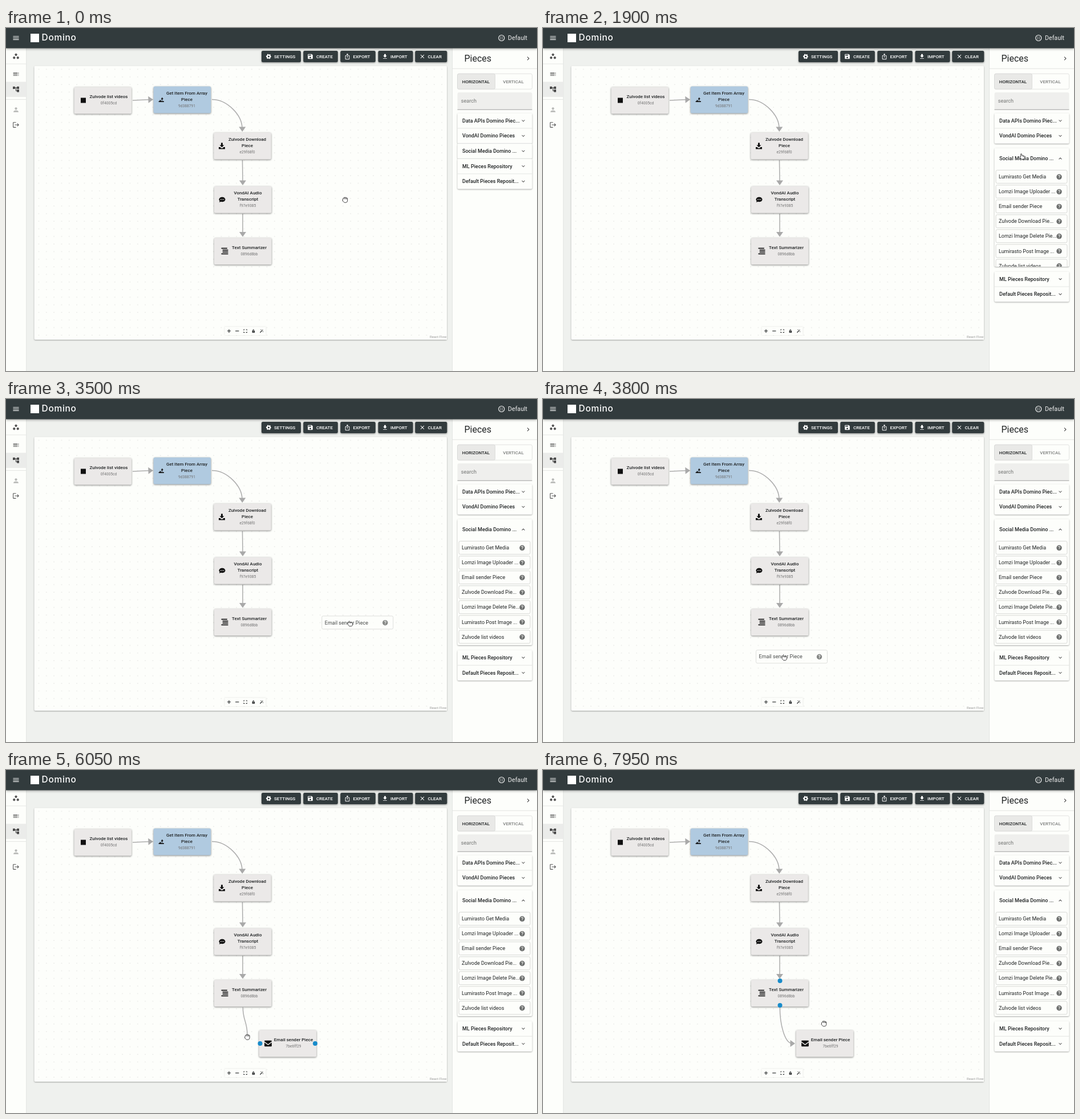
Animation, 931 px wide and 602 px high, one loop 8 s. Source, as an HTML page:

```html
<!DOCTYPE html>
<html lang="en">
<head>
<meta charset="utf-8">
<title>Workflow editor</title>
<style>
html, body { margin: 0; width: 100%; height: 100%; overflow: hidden; background: #eff1ee; }
svg { display: block; width: 931px; height: 602px; font-family: Roboto, sans-serif; }
.paper { fill: #fdfefb; filter: drop-shadow(0 1px 1px #0005); }
.node { filter: drop-shadow(0 1px 1.5px #0007); }
.line { stroke: #dfe0dd; stroke-width: .8; }
.edge { fill: none; stroke: #adadad; stroke-width: 1.5; }
.tip { fill: #a9a9a9; }
.dot { fill: #178bca; }
</style>
</head>
<body>
<svg id="stage" viewBox="0 0 931 602"></svg>
<script>
const WHITE = '#fdfefb', INK = '#202324', DARK = '#323b3d';
const ICON = {
  menu: 'M3 18h18v-2H3zM3 13h18v-2H3zM3 6v2h18V6z',
  groups: 'M6 13a4 4 0 1 0 .01 0zM12 3a4 4 0 1 0 .01 0zM18 13a4 4 0 1 0 .01 0z',
  toc: 'M3 9h14V7H3zM3 13h14v-2H3zM3 17h14v-2H3zM19 17h2v-2h-2zM19 7v2h2V7zM19 13h2v-2h-2z',
  tree: 'M22 11V3h-7v3H9V3H2v8h7V8h2v10h4v3h7v-8h-7v3h-2V8h2v3z',
  person: 'M12 12a4 4 0 1 0 0-8 4 4 0 0 0 0 8zm0 2c-2.67 0-8 1.34-8 4v2h16v-2c0-2.66-5.33-4-8-4z',
  logout: 'M17 7l-1.41 1.41L18.17 11H8v2h10.17l-2.58 2.58L17 17l5-5zM4 5h8V3H4c-1.1 0-2 .9-2 2v14c0 1.1.9 2 2 2h8v-2H4z',
  save: 'M17 3H5a2 2 0 0 0-2 2v14c0 1.1.9 2 2 2h14c1.1 0 2-.9 2-2V7zm-5 16a3 3 0 1 1 0-6 3 3 0 0 1 0 6zm3-10H5V5h10z',
  share: 'M16 5l-1.42 1.42-1.59-1.59V16h-1.98V4.83L9.42 6.42 8 5l4-4zm4 5v11c0 1.1-.9 2-2 2H6a2 2 0 0 1-2-2V10c0-1.1.9-2 2-2h3v2H6v11h12V10h-3V8h3c1.1 0 2 .9 2 2z',
  get: 'M19 9h-4V3H9v6H5l7 7zM5 18v2h14v-2z',
  close: 'M19 6.41L17.59 5 12 10.59 6.41 5 5 6.41 10.59 12 5 17.59 6.41 19 12 13.41 17.59 19 19 17.59 13.41 12z',
  down: 'M16.59 8.59L12 13.17 7.41 8.59 6 10l6 6 6-6z',
  right: 'M10 6L8.59 7.41 13.17 12l-4.58 4.59L10 18l6-6z',
  help: 'M12 2a10 10 0 1 0 0 20 10 10 0 0 0 0-20zm1 17h-2v-2h2zm2.07-7.75l-.9.92C13.45 12.9 13 13.5 13 15h-2v-.5c0-1.1.45-2.1 1.17-2.83l1.24-1.26c.37-.36.59-.86.59-1.41a2 2 0 0 0-4 0H8a4 4 0 1 1 8 0c0 .88-.36 1.68-.93 2.25z',
  square: 'M3 3h18v18H3z',
  lift: 'M1 21v-4h4v-4h5v4h12v4zM13 15v-6h-3l5-7 5 7h-4v6z',
  load: 'M9 1h6v8h5l-8 8-8-8h5zM1 16h5l4 4h4l4-4h5v7H1z',
  chat: 'M12 3C5.5 3 1 7 1 11.5c0 2 .9 4 2.4 5.300L1.500 21c3 0 5-.8 6.500-1.700 1.200.4 2.600.6 4 .6 6.500 0 11-3.900 11-8.400S18.500 3 12 3zM7 10a1.500 1.500 0 1 1-.01 0zM12 10a1.500 1.500 0 1 1-.01 0zM17 10a1.500 1.500 0 1 1-.01 0z',
  bars: 'M1 1h19v3H1zM5 7h18v3H5zM5 13h18v3H5zM1 19h22v3H1z',
  mail: 'M1 5q0-2 2-2h18q2 0 2 2v1l-11 8L1 6zM1 9l11 8 11-8v10q0 2-2 2H3q-2 0-2-2z',
  plus: 'M10 1h4v9h9v4h-9v9h-4v-9H1v-4h9z',
  minus: 'M1 10h22v4H1z',
  fit: 'M1 8V1h7v3H4v4zM16 1h7v7h-3V4h-4zM23 16v7h-7v-3h4v-4zM8 23H1v-7h3v4h4z',
  lock: 'M4 10h3V7a5 5 0 0 1 10 0h-3a2 2 0 0 0-4 0v3h10v12H4zM12 14a2 2 0 1 0 .01 0z',
  wand: 'M1 20L14 7l3 3L4 23zM15 6l3-3 3 3-3 3zM8 1l1 3 3 1-3 1-1 3-1-3-3-1 3-1zM20 12l1 3 3 1-3 1-1 3-1-3-3-1 3-1z'
};
const HANDS = {
  grab: 'M-4 1V-1.500Q-3.700-2.600-2.600-2V-3.400Q-1.700-4.800-.8-3.900 .2-5 1.200-3.800 2.300-4.500 2.900-3.200 4.100-3.400 4.200-2V1.500Q4 4.500 1.800 4.800H-1.200Q-2.600 4-4.500 1.500-4.800.5-4 1ZM-.8-3.900V-1M1.200-3.800V-1M2.900-3.200V-1',
  fist: 'M-4 0Q-4.300-2-2.500-2-1.500-3.200-.4-2.300 .7-3.200 1.600-2.200 3.200-2.800 3.600-1.200 4.600-1 4.400.5V2Q4 4.300 2.200 4.600H-1.200Q-2.800 3.500-4 1.400ZM-.4-2.300V-.5M1.600-2.200V-.5',
  point: 'M-2.300 1V-4Q-1.500-5.300-.7-4V-1.200Q.4-2 1.200-1 2.200-1.500 2.700-.6 4-.8 4.200.6V2.500Q4 4.800 2.200 5.200H-.8Q-2.500 4-4.300 1.600-4.300.2-2.300 1ZM1.200-1V.6M2.700-.6V.8'
};

// y is the middle of the capitals
const text = (x, y, s, size, weight = 400, fill = INK, anchor = 'start') =>
  `<text x="${x}" y="${y + size * .355}" font-size="${size}" font-weight="${weight}" fill="${fill}" text-anchor="${anchor}">${s}</text>`;
const icon = (name, x, y, size, fill = INK, turn = 0) =>
  `<path d="${ICON[name]}" fill="${fill}" fill-rule="evenodd" transform="translate(${x} ${y}) rotate(${turn}) scale(${size / 24}) translate(-12 -12)"/>`;
const rect = (x, y, w, h, fill, more = '') =>
  `<rect x="${x}" y="${y}" width="${w}" height="${h}" fill="${fill}" ${more}/>`;
const paper = (x, y, w, h, id = '') => rect(x, y, w, h, WHITE, `rx="2" class="paper" id="${id}"`);
const line = (x1, y1, x2, y2, id = '') =>
  `<line x1="${x1}" y1="${y1}" x2="${x2}" y2="${y2}" class="line" id="${id}"/>`;
const tip = (x, y, turn) =>
  `<path class="tip" d="M0 0L-8.500-6V6Z" transform="translate(${x} ${y}) rotate(${turn})"/>`;
const edge = d => `<path class="edge" d="${d}"/>`;
const handles = (id, ...points) => `<g id="${id}">` +
  points.map(([x, y]) => `<circle class="dot" cx="${x}" cy="${y}" r="4"/>`).join('') + '</g>';

function gear(x, y) {
  return `<g transform="translate(${x} ${y})" fill="none" stroke="#fff"><circle r="2.6" stroke-width="2"/>
    <circle r="3.9" stroke-width="1.300" stroke-dasharray="2.042" stroke-dashoffset="1"/></g>`;
}

function button(x, w, iconX, textX, name, label) {
  const mark = name === 'gear' ? gear(iconX, 50) : icon(name, iconX, 50, 11.5, '#fff');
  return rect(x, 40, w, 20, DARK, 'rx="2.5" class="node"') + mark + text(textX, 50, label, 8, 500, '#fff');
}

function node(x, y, titleX, lines, code, name, iconX, size, fill = '#ebe9e8') {
  const first = lines.length > 1 ? 11.5 : 17;
  return rect(x, y, 100.5, 47, fill, 'rx="2.5" class="node"') +
    icon(name, iconX, y + 23.5, size, '#111') +
    lines.map((s, i) => text(titleX, y + first + i * 10.8, s, 8, 500, INK, 'middle')).join('') +
    text(titleX, y + first + lines.length * 10.8 + .6, code, 6.7, 400, '#747474', 'middle');
}

const piece = (s, y) => rect(794, y - 11.5, 125, 23, WHITE, 'rx="2.5" stroke="#cfd0cd" stroke-width=".8"') +
  text(799, y, s, 9) + icon('help', 905, y + .3, 11.3, '#6b6d6c');
const header = (s, y) => text(800, y, s, 9, 500) + icon('down', 907, y, 11, '#444');

const pieces = ['Lumirasto Get Media', 'Lomzi Image Uploader ...', 'Email sender Piece', 'Zulvode Download Pie...',
  'Lomzi Image Delete Pie...', 'Lumirasto Post Image ...', 'Zulvode list videos'];

document.getElementById('stage').innerHTML = `
<defs>
  <pattern id="dots" x="50.800" y="65.700" width="13.333" height="13.333" patternUnits="userSpaceOnUse">
    <circle cx="6.667" cy="6.667" r=".55" fill="#b9bab8"/></pattern>
  <clipPath id="fold"><rect id="foldBox" x="785" y="230" width="146" height="0"/></clipPath>
</defs>
${rect(0, 0, 931, 602, '#eff1ee')}
${paper(49.5, 66.5, 723.5, 480.5)}
${rect(49.5, 66.5, 723.5, 480.5, 'url(#dots)')}
${rect(741, 537, 32, 10, WHITE)}
${text(743, 541.8, 'React Flow', 6, 400, '#999')}
${edge('M222 127L250 125.800')}${tip(258, 125.5, -2)}
${edge('M361 125.500C388 125.500 414 153 414 176')}${tip(414.3, 182, 90)}
${edge('M414.500 232L415 269')}${tip(415, 276, 90)}
${edge('M415 326V360')}${tip(415, 366.5, 90)}
${node(119.5, 103.5, 180, ['Zulvode list videos'], '0f4005cd', 'square', 135.5, 12)}
${node(258.7, 102.5, 317, ['Get Item From Array', 'Piece'], '9d388791', 'lift', 272.5, 10.5, '#b0cae0')}
${node(364.3, 183.5, 423, ['Zulvode Download', 'Piece'], 'e29f68f0', 'load', 378.5, 12)}
${node(365, 277.7, 424, ['VondAI Audio', 'Transcript'], 'f97e9385', 'chat', 379, 12)}
${node(365, 368.3, 426.5, ['Text Summarizer'], '0896d8bb', 'bars', 383.5, 13)}
<g id="mailNode">${node(443.7, 456.5, 504, ['Email sender Piece'], '7be6ff29', 'mail', 459.5, 14)}</g>
<path id="wire" class="edge"/>
<g id="wireTip">${tip(442, 480, 0)}</g>
${handles('sumDots', [415.5, 370], [415.5, 413])}
${handles('mailDots', [445.5, 480], [542, 480])}
${rect(383.5, 524.5, 72, 14.5, WHITE, 'style="filter:drop-shadow(0 0 1px #0002)"')}
${['plus', 'minus', 'fit', 'lock', 'wand'].map((n, i) => icon(n, 391 + i * 14.3, 531.8, 6.8)).join('')}
${button(448, 69, 460.5, 470, 'gear', 'SETTINGS')}
${button(521.3, 60.5, 533.5, 544, 'save', 'CREATE')}
${button(586.3, 61.5, 598.5, 608.5, 'share', 'EXPORT')}
${button(652.5, 61, 664.5, 674, 'get', 'IMPORT')}
${button(717.3, 56, 730, 739.5, 'close', 'CLEAR')}

${rect(0, 35, 35.5, 567, WHITE)}${line(35.7, 35, 35.7, 602)}
${rect(0, 94.5, 35.5, 26.5, '#ebecea')}
${line(0, 63, 35.5, 63)}${line(0, 125.5, 35.5, 125.5)}
${icon('groups', 17.5, 49.5, 13, '#555')}${icon('toc', 17.5, 81, 13, '#555')}
${icon('tree', 17.5, 107.5, 13, '#444')}${icon('person', 17.5, 143.5, 13, '#b9bab8')}
${icon('logout', 17.5, 170, 13, '#555')}

${rect(782.5, 35, 149, 567, WHITE)}${line(782.5, 35, 782.5, 602)}${line(782.5, 71.3, 931, 71.3)}
${text(803.5, 53, 'Pieces', 16)}${icon('right', 915.5, 53.5, 13, '#444')}
${rect(791.5, 80.3, 131, 27, WHITE, 'rx="2.5" stroke="#dcdddb" stroke-width=".8"')}
${rect(791.5, 80.3, 66, 27, '#e9e9e7', 'rx="2.5" stroke="#d6d7d5" stroke-width=".8"')}
${text(824, 93.7, 'HORIZONTAL', 8, 500, INK, 'middle')}${text(889.5, 93.7, 'VERTICAL', 8, 500, '#7d7f7e', 'middle')}
<path d="M791.500 143.300V116q0-3 3-3h125q3 0 3 3v27.300z" fill="#efefed"/>
${rect(791.5, 142.8, 131, .8, '#8d8e8c')}
${text(797.8, 128, 'search', 9.1, 400, '#737573')}

${paper(791.5, 149.5, 131, 53.2)}${paper(791.5, 202.7, 131, 26.6, 'openPaper')}
${header('Data APIs Domino Piec...', 162.7)}${line(791.5, 176, 922.5, 176)}
${header('VondAI Domino Pieces', 189.2)}
<g id="social">${text(800, 0, 'Social Media Domino ...', 9, 500)}<g id="arrow">${icon('down', 0, 0, 11, '#444')}</g></g>
<g clip-path="url(#fold)"><g id="list">${pieces.map((s, i) => piece(s, 261 + i * 26.07)).join('')}</g></g>
<g id="rest">${paper(791.5, 0, 131, 53.2)}${header('ML Pieces Repository', 13.2)}
  ${line(791.5, 26.6, 922.5, 26.6)}${header('Default Pieces Reposit...', 39.8)}</g>
<g id="seams">${line(791.5, 202.7, 922.5, 202.7)}${line(791.5, 229.3, 922.5, 229.3)}</g>

<rect width="931" height="35.5" fill="${DARK}" style="filter:drop-shadow(0 1px 2px #0006)"/>
${icon('menu', 17.5, 17.5, 13.5, '#fff')}
${rect(43, 10, 15, 15, '#fff')}
<text x="62.500" y="22.200" font-family="Inter, sans-serif" font-size="15.500" font-weight="500" letter-spacing=".7" fill="#fff">Domino</text>
<circle cx="868.800" cy="17.500" r="5" fill="none" stroke="#fff" stroke-width="1.100"/>
${[[-1.5, -1.5], [1.5, -1.5], [-1.5, 1.5], [1.5, 1.5]].map(([x, y]) => `<circle cx="${868.8 + x}" cy="${17.5 + y}" r=".8" fill="#fff"/>`).join('')}
${text(880, 17.7, 'Default', 10.67, 400, '#eee')}

<g id="ghost" opacity=".82">${piece('Email sender Piece', 313)}</g>
<path id="hand" fill="#fff" stroke="#333" stroke-width=".9" stroke-linejoin="round"/>`;

// pointer stops: time, x, y
const stops = [[0, 594.5, 301.5], [700, 594.5, 301.5], [1450, 840, 225], [2250, 840, 225], [2600, 841, 320],
  [2800, 841, 315.5], [3200, 841, 315.5], [3750, 422.5, 454], [3800, 423, 454], [3950, 433, 455],
  [4000, 433, 455], [4250, 447.5, 456], [4550, 447.5, 456], [4600, 445, 459], [4850, 445, 459],
  [5300, 417.5, 413], [5650, 417.5, 413], [6050, 423, 468.5], [6450, 443.5, 484], [6500, 443.5, 484],
  [6750, 443.5, 479.5], [7650, 443.5, 479.5], [7950, 492.5, 445], [8000, 492.5, 445]];

const clamp = v => Math.max(0, Math.min(1, v));
const smooth = v => v * v * (3 - 2 * v);
const settle = v => 1 - (1 - clamp(v)) ** 2.1;

function pointer(t) {
  const i = stops.findIndex(s => s[0] > t);
  const [t0, x0, y0] = stops[i - 1], [t1, x1, y1] = stops[i];
  const k = smooth((t - t0) / (t1 - t0));
  return [x0 + (x1 - x0) * k, y0 + (y1 - y0) * k];
}

const $ = id => document.getElementById(id);
const set = (id, key, value) => $(id).setAttribute(key, value);
const show = (id, on) => set(id, 'visibility', on ? 'visible' : 'hidden');
const move = (id, x, y) => set(id, 'transform', `translate(${x} ${y})`);

function accordion(t) {
  const head = smooth(clamp((t - 1700) / 150)), body = settle((t - 1700) / 280);
  const top = 202.7 + 8 * head, tall = 26.6 + 9.8 * head, inner = 184.9 * body;
  set('openPaper', 'y', top);
  set('openPaper', 'height', tall + inner);
  move('social', 0, 216 + 13.2 * head);
  set('arrow', 'transform', `translate(907 0) rotate(${180 * head})`);
  set('foldBox', 'y', top + tall);
  set('foldBox', 'height', inner);
  move('list', 0, 17.8 * (head - 1));
  move('rest', 0, top + tall + inner + 8.7 * head);
  set('seams', 'opacity', 1 - head);
}

function wire(t, x, y) {
  const sx = 415.3, sy = 416, snapped = t >= 7100;
  const mid = sy + (y - 3.5 - sy) / 2;
  show('wire', t >= 5700);
  show('wireTip', t >= 7500);
  set('wire', 'stroke-width', 1.5);
  set('wire', 'd', snapped ? `M${sx} ${sy}C${sx} 448 424 478 ${t >= 7500 ? 436 : 442} 480`
    : `M${sx} ${sy}C${sx} ${mid} ${x} ${mid} ${x} ${y - 3.5}`);
}

function handShape(t, x) {
  if (t >= 3250 && t < 4600) return 'fist';
  const overNode = t >= 4600 && t < 4950 || t >= 5200 && t < 5500;
  return overNode || x > 783 ? 'point' : 'grab';
}

function draw() {
  const t = Math.floor(performance.now() % 8000 / 50) * 50;
  const [x, y] = pointer(t);
  accordion(t);
  wire(t, x, y);
  const [gx, gy] = pointer(Math.min(t, 4550));
  move('ghost', gx - 49.5 - 794, gy - 1.8 - 313);
  show('ghost', t >= 3200 && t < 4650);
  show('mailNode', t >= 4650);
  show('mailDots', t >= 4650 && t < 4950 || t >= 5950 && t < 7800);
  show('sumDots', t >= 5150 && t < 5800 || t >= 7800);
  set('hand', 'd', HANDS[handShape(t, x)]);
  move('hand', x, y);
  requestAnimationFrame(draw);
}
draw();
</script>
</body>
</html>
```
